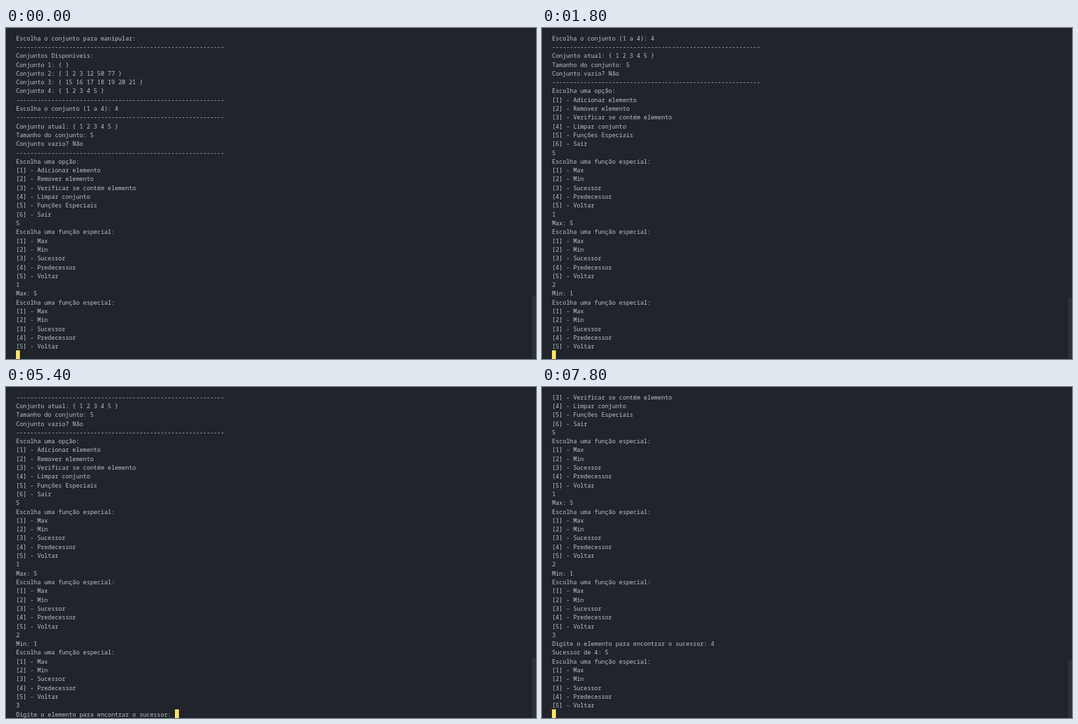
Recreate the animation shown at these times as an HTML page with a canvas. Size 800 by 500 pixels, loop 8000 ms.

```html
<!DOCTYPE html>
<html lang="pt">
<head>
<meta charset="utf-8">
<title>Conjuntos</title>
<style>
  html, body { margin: 0; width: 100%; height: 100%; overflow: hidden; background: #21252b; }
  canvas { display: block; width: 800px; height: 500px; }
</style>
</head>
<body>
<canvas id="term" width="800" height="500"></canvas>
<script>
const ctx = document.getElementById('term').getContext('2d');
const LOOP = 8000, ROWS = 37;
const LEFT = 15.2, TOP = 8.8, ROW_H = 13.305, CHAR_W = 5.322;
const FONT_PX = 20, SCALE = CHAR_W / (FONT_PX * 0.6);

const rule = '-'.repeat(59);
const menu = (title, ...items) => [title, ...items.map((s, i) => `[${i + 1}] - ${s}`)];
const special = menu('Escolha uma função especial:', 'Max', 'Min', 'Sucessor', 'Predecessor', 'Voltar');
const ask = 'Digite o elemento para encontrar o sucessor: ';

const intro = [
  'Escolha o conjunto para manipular:', rule,
  'Conjuntos Disponíveis:',
  'Conjunto 1: { }',
  'Conjunto 2: { 1 2 3 12 50 77 }',
  'Conjunto 3: { 15 16 17 18 19 20 21 }',
  'Conjunto 4: { 1 2 3 4 5 }', rule,
  'Escolha o conjunto (1 a 4): 4', rule,
  'Conjunto atual: { 1 2 3 4 5 }',
  'Tamanho do conjunto: 5',
  'Conjunto vazio? Não', rule,
  ...menu('Escolha uma opção:', 'Adicionar elemento', 'Remover elemento',
    'Verificar se contém elemento', 'Limpar conjunto', 'Funções Especiais', 'Sair'),
  '5', ...special, '1', 'Max: 5', ...special
];
const afterMin = [...intro, '2', 'Min: 1', ...special];
const asking = [...afterMin, '3'];
const afterNext = [...asking, ask + '4', 'Sucessor de 4: 5', ...special];

// time, printed lines, line being typed, top of the scrollbar thumb
const steps = [
  [0, intro, '', 404],
  [1600, intro, '2', 404],
  [1800, afterMin, '', 408],
  [4000, afterMin, '4', 408],
  [4800, afterMin, '', 408],
  [5000, afterMin, '3', 408],
  [5400, asking, ask, 408],
  [7400, asking, ask + '4', 408],
  [7800, afterNext, '', 412]
];

function draw([, printed, input, thumb]) {
  ctx.setTransform(1, 0, 0, 1, 0, 0);
  ctx.fillStyle = '#21252b';
  ctx.fillRect(0, 0, 800, 500);
  ctx.fillStyle = '#2c3038';
  ctx.fillRect(794, thumb, 6, 500 - thumb);

  ctx.fillStyle = '#ffe464';
  ctx.fillRect(Math.round(LEFT + input.length * CHAR_W), 487, 6, 13);

  ctx.font = `${FONT_PX}px "Noto Sans Mono", "DejaVu Sans Mono", monospace`;
  ctx.textBaseline = 'alphabetic';
  ctx.fillStyle = '#bcc2c9';
  [...printed, input].slice(-ROWS).forEach((line, row) => {
    ctx.setTransform(SCALE, 0, 0, SCALE, LEFT, TOP + row * ROW_H + 9.8);
    ctx.fillText(line, 0, 0);
  });
}

let shown;
function tick() {
  const t = performance.now() % LOOP;
  const step = steps.findLast(s => s[0] <= t);
  if (step !== shown) draw(shown = step);
  requestAnimationFrame(tick);
}
tick();
</script>
</body>
</html>
```
